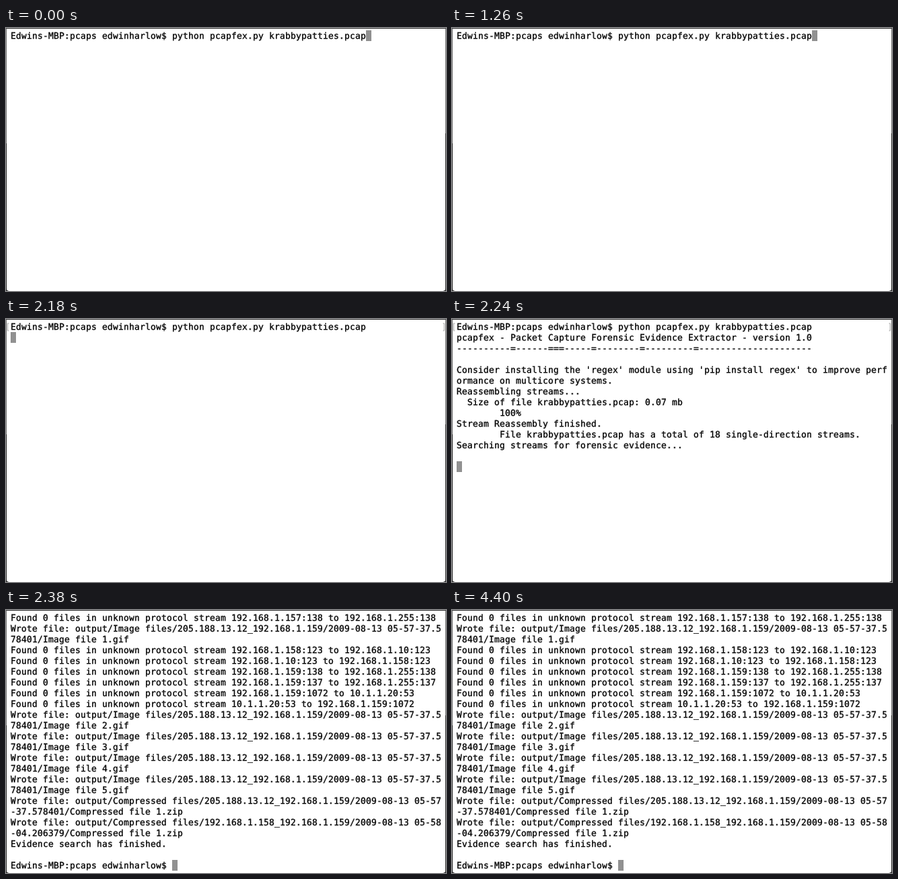
These frames come from a looping animation (572 px wide and 342 px high, 5740 ms). An HTML page:

```html
<!DOCTYPE html>
<html lang="en">
<head>
<meta charset="utf-8">
<title>Terminal session</title>
<style>
  html, body { margin: 0; width: 100%; height: 100%; overflow: hidden; background: #fff; }
  svg { display: block; }
  text {
    font: 11.3px "DejaVu Sans Mono", "Liberation Mono", monospace;
    text-rendering: geometricPrecision;
    color: #000; fill: currentColor; stroke: currentColor; stroke-width: .3px;
  }
  .mark { color: #a6a6a6; stroke: none; }
</style>
</head>
<body>
<svg id="stage" width="572" height="342" viewBox="0 0 572 342">
  <rect width="572" height="342" fill="#fff"/>
  <g id="lines"></g>
  <rect id="cursor" width="7" height="14" fill="#919191"/>
  <g id="edge" shape-rendering="crispEdges">
    <path d="M0 0H572V1H0Z" fill="#4a4a4a"/>
    <path d="M0 1H1V150H0ZM571 1H572V137H571Z" fill="#868686"/>
    <path d="M0 150H1V342H0ZM571 137H572V342H571Z" fill="#484848"/>
  </g>
  <path d="M0 338Q.6 341.4 4 342H0ZM572 338Q571.4 341.4 568 342H572Z" fill="#333"/>
</svg>
<script>
const LOOP = 5740, COLS = 80, CELL = 7, ROW = 14, LEFT = 6, TOP = 3;
const NS = "http://www.w3.org/2000/svg";
const lines = document.getElementById("lines");
const cursor = document.getElementById("cursor");

const prompt = "Edwins-MBP:pcaps edwinharlow$ ";
const command = prompt + "python pcapfex.py krabbypatties.pcap";

const found = (from, to) => `Found 0 files in unknown protocol stream ${from} to ${to}`;
const wrote = (kind, n, ext, from, stamp) =>
  `Wrote file: output/${kind} files/${from}_192.168.1.159/2009-08-13 ${stamp}/${kind} file ${n}.${ext}`;
const image = n => wrote("Image", n, "gif", "205.188.13.12", "05-57-37.578401");
const zip = (from, stamp) => wrote("Compressed", 1, "zip", from, stamp);

const intro = [
  command,
  "pcapfex - Packet Capture Forensic Evidence Extractor - version 1.0",
  [10, 6, 0, 0, 5, 8, 9, 21].map(n => "-".repeat(n)).join("="),
  "",
  "Consider installing the 'regex' module using 'pip install regex' to improve performance on multicore systems.",
  "Reassembling streams...",
  "  Size of file krabbypatties.pcap: 0.07 mb",
  "        100%",
  "Stream Reassembly finished.",
  "        File krabbypatties.pcap has a total of 18 single-direction streams.",
  "Searching streams for forensic evidence...",
  "",
  ""
];

const report = [
  found("192.168.1.157:138", "192.168.1.255:138"),
  image(1),
  found("192.168.1.158:123", "192.168.1.10:123"),
  found("192.168.1.10:123", "192.168.1.158:123"),
  found("192.168.1.159:138", "192.168.1.255:138"),
  found("192.168.1.159:137", "192.168.1.255:137"),
  found("192.168.1.159:1072", "10.1.1.20:53"),
  found("10.1.1.20:53", "192.168.1.159:1072"),
  ...[2, 3, 4, 5].map(image),
  zip("205.188.13.12", "05-57-37.578401"),
  zip("192.168.1.158", "05-58-04.206379"),
  "Evidence search has finished.",
  ""
];

// The cursor follows the last line of each screen.
const screens = [
  { at: 0, out: [command] },
  { at: 2100, out: [command, ""], marks: true },
  { at: 2240, out: intro, marks: true },
  { at: 2310, out: [...report, ""] },
  { at: 2380, out: [...report, prompt] }
];

const wrap = s => s.match(new RegExp(`.{1,${COLS}}`, "g")) || [""];

function put(str, col, row, cls) {
  const t = document.createElementNS(NS, "text");
  t.setAttribute("x", [...str].map((_, i) => LEFT + (col + i) * CELL).join(" "));
  t.setAttribute("y", TOP + row * ROW + 11);
  if (cls) t.setAttribute("class", cls);
  t.textContent = str.replace(/ /g, "\u00a0");
  lines.append(t);
}

function draw({ out, marks }) {
  const rows = out.flatMap(wrap);
  const last = rows.length - 1;
  lines.replaceChildren();
  rows.forEach((s, r) => s && put(s, 0, r));
  if (marks) {
    put("[", -1, 0, "mark");
    put("]", COLS, 0, "mark");
  }
  cursor.setAttribute("x", LEFT + rows[last].length * CELL);
  cursor.setAttribute("y", TOP + last * ROW);
}

let shown;
function tick() {
  const t = performance.now() % LOOP;
  const next = screens.filter(s => s.at <= t).pop();
  if (next !== shown) draw(shown = next);
  requestAnimationFrame(tick);
}
tick();
</script>
</body>
</html>
```
